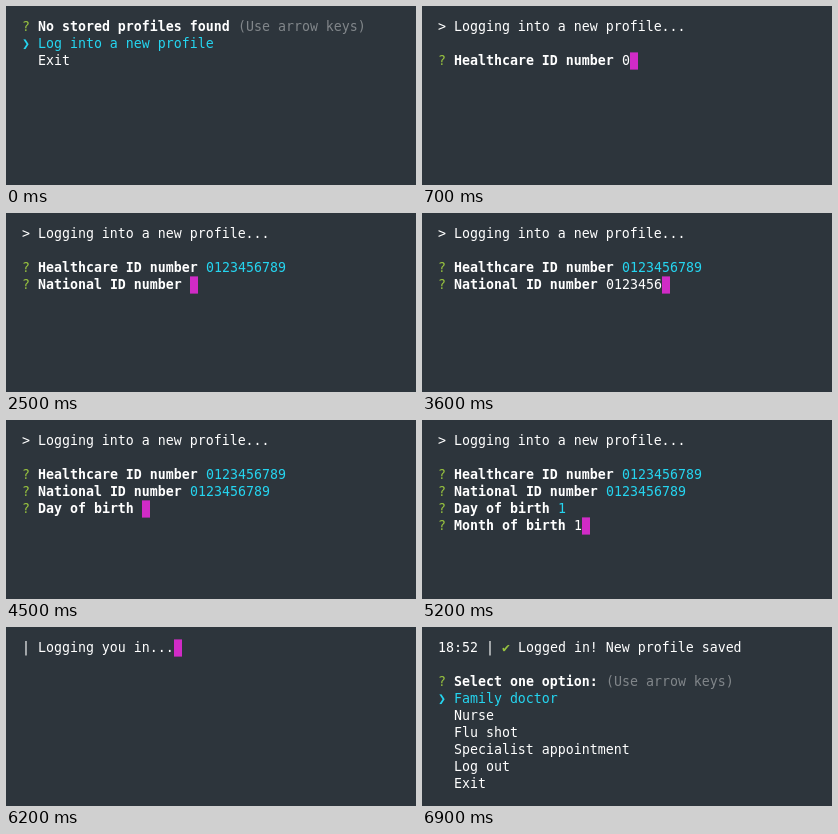
Animation of 410 by 179 pixels, one loop 8 s. Source, as an HTML page:

```html
<!DOCTYPE html>
<html lang="en">
<head>
<meta charset="utf-8">
<title>Terminal login</title>
<style>
  html, body { margin: 0; width: 100%; height: 100%; overflow: hidden; background: #2d353c; }
  svg { display: block; width: 410px; height: 179px; }
  text { font: 13.288px "DejaVu Sans Mono", monospace; fill: #fff; white-space: pre; }
  .bold { font-weight: bold; }
  .cyan { fill: #25d5f0; }
  .green { fill: #98c33f; }
  .gray { fill: #81868a; }
</style>
</head>
<body>
<svg id="screen" viewBox="0 0 410 179" role="img"></svg>
<script>
const LOOP = 8000, CELL = 8, ROW = 17, LEFT = 16, TOP = 12;
const screen = document.getElementById("screen");

// Key times of each prompt; a prompt opens at `start` and is submitted at `end`.
const prompts = [
  { label: "Healthcare ID number", value: "0123456789", start: 400, end: 2500,
    keys: [700, 800, 900, 1100, 1300, 1400, 1500, 1800, 2000, 2200] },
  { label: "National ID number", value: "0123456789", start: 2500, end: 4500,
    keys: [2700, 2800, 2900, 3000, 3200, 3300, 3600, 3800, 4000, 4300] },
  { label: "Day of birth", value: "1", start: 4500, end: 5000, keys: [4800] },
  { label: "Month of birth", value: "1", start: 5000, end: 5400, keys: [5200] },
  { label: "Year of birth", value: "1970", start: 5400, end: 6200,
    keys: [5500, 5700, 5800, 6000] }
];

// Each span is [text, class]; spans follow one another on the character grid.
function line(row, ...spans) {
  let col = 0, out = "";
  for (const [str, style = ""] of spans) {
    const x = LEFT + col * CELL, y = TOP + 13 + row * ROW;
    out += `<text x="${x}" y="${y}" class="${style}">${str.replace(/>/g, "&gt;")}</text>`;
    col += str.length;
  }
  return out;
}

function cursor(row, col) {
  return `<rect x="${LEFT + col * CELL}" y="${TOP + row * ROW + 0.4}" width="${CELL}" height="17.2" fill="#d02bc6"/>`;
}

function question(row, label, ...rest) {
  return line(row, ["? ", "green"], [label + " ", "bold"], ...rest);
}

function menu(row, items) {
  return items.map((item, i) => i
    ? line(row + i, ["  " + item])
    : line(row, ["❯ " + item, "cyan"])).join("");
}

const hint = ["(Use arrow keys)", "gray"];

function form(t) {
  let out = line(0, ["> Logging into a new profile..."]);
  prompts.forEach((p, i) => {
    if (t < p.start) return;
    const row = i + 2, done = t >= p.end;
    const typed = p.value.slice(0, p.keys.filter(k => t >= k).length);
    out += question(row, p.label, [typed, done ? "cyan" : ""]);
    if (!done) out += cursor(row, p.label.length + 3 + typed.length);
  });
  return out;
}

function spinner(t) {
  const msg = "|/-\\"[Math.floor((t - 6200) / 100) % 4] + " Logging you in...";
  return line(0, [msg]) + cursor(0, msg.length);
}

function view(t) {
  if (t < 400) return question(0, "No stored profiles found", hint) +
    menu(1, ["Log into a new profile", "Exit"]);
  if (t < 6200) return form(t);
  if (t < 6900) return spinner(t);
  return line(0, ["18:52 | "], ["✔", "green"], [" Logged in! New profile saved"]) +
    question(2, "Select one option:", hint) +
    menu(3, ["Family doctor", "Nurse", "Flu shot", "Specialist appointment", "Log out", "Exit"]);
}

let shown = "";
function draw(now) {
  const next = view(now % LOOP);
  if (next !== shown) screen.innerHTML = shown = next;
  requestAnimationFrame(draw);
}
draw(performance.now());
</script>
</body>
</html>
```
